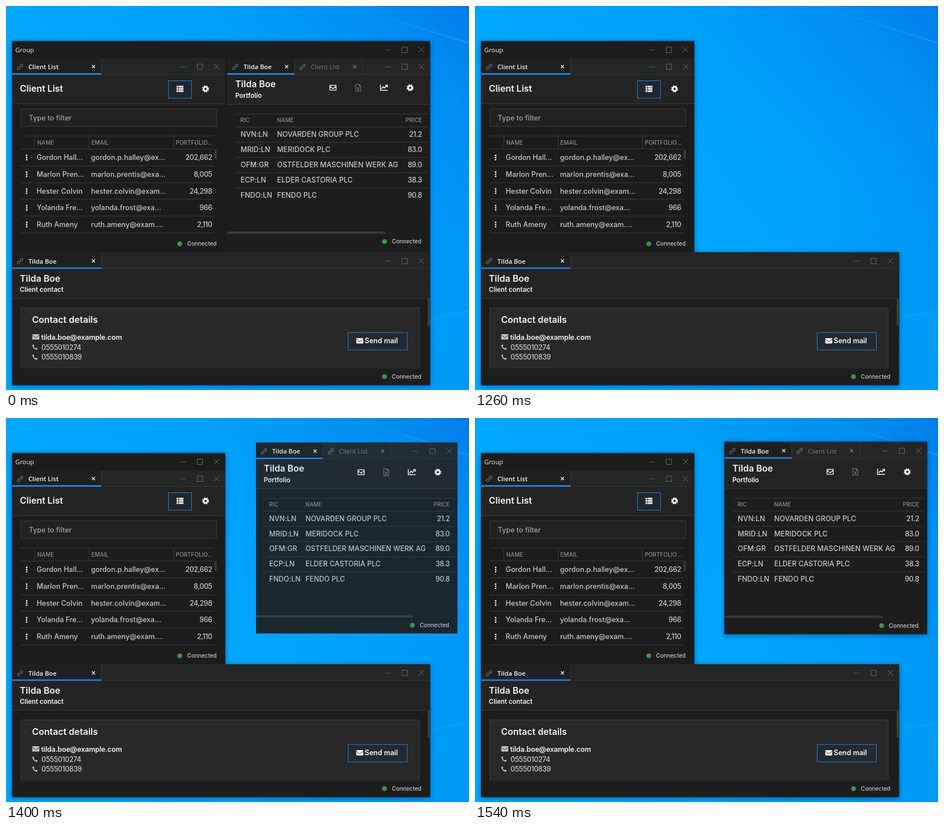
Animation, 822 px wide and 681 px high, one loop 2.93 s. Source, as an HTML page:

```html
<!DOCTYPE html>
<html lang="en">
<head>
<meta charset="utf-8">
<title>Window undocking</title>
<style>
html, body { margin: 0; width: 100%; height: 100%; overflow: hidden; background: #00a2f8; }
svg { display: block; width: 822px; height: 681px; }
text { font-family: Inter, "Noto Sans", sans-serif; white-space: pre; }
text.ui { font-family: "Open Sans", "Noto Sans", sans-serif; }
</style>
</head>
<body>
<svg id="stage" viewBox="0 0 822 681" xmlns="http://www.w3.org/2000/svg"></svg>
<script>
const LOOP = 2930, START = 1120, STEP = 70;
const BLUE = '#2080d6', LINE = '#393939', WHITE = '#f4f4f4', SOFT = '#c8c8c8', DIM = '#8c8c8c';
const CLIENT = 'Tilda Boe';

const rect = (x, y, w, h, fill, extra = '') =>
  `<rect x="${x}" y="${y}" width="${w}" height="${h}" fill="${fill}" ${extra}/>`;
const box = (x, y, w, h, fill, stroke) => rect(x, y, w, h, fill, `stroke="${stroke}"`);
const path = (d, stroke, width = 1, extra = '') =>
  `<path d="${d}" fill="none" stroke="${stroke}" stroke-width="${width}" ${extra}/>`;
const hline = (x1, x2, y, color = LINE) => rect(x1, y, x2 - x1, 1, color);
const vline = (x, y1, y2, color = LINE) => rect(x, y1, 1, y2 - y1, color);
const at = (x, y, body, turn = 0) => `<g transform="translate(${x} ${y}) rotate(${turn})">${body}</g>`;

function text(x, y, size, str, fill = SOFT, o = {}) {
  return `<text x="${x}" y="${y}" font-size="${size}" fill="${fill}" font-weight="${o.weight || 400}"` +
    ` text-anchor="${o.end ? 'end' : 'start'}" letter-spacing="${o.gap || 0}" class="${o.ui ? 'ui' : ''}">${str}</text>`;
}
const cell = (x, y, str, fill = SOFT) => text(x, y, 12.5, str, fill, { weight: 500, gap: 0.05 });
const num = (x, y, str, end = true) => text(x, y, 12.5, str, SOFT, { weight: 500, gap: -0.4, end });
const label = (x, y, str, end) => text(x, y, 10, str, DIM, { weight: 500, end });
const heading = (x, y, str) => text(x, y, 16, str, WHITE, { weight: 600 });
const subhead = (x, y, str) => text(x, y, 11.5, str, WHITE, { weight: 600 });

// icons
const link = (x, y) => at(x, y,
  path('M-0.8-2H-4a2 2 0 0 0 0 4h2.8M0.8 2H4a2 2 0 0 0 0-4H1.2M-2 0H2', '#858585', 1), -45);
const cross = (x, y, r, color, w) =>
  path(`M${x - r} ${y - r}L${x + r} ${y + r}M${x + r} ${y - r}L${x - r} ${y + r}`, color, w);
const controls = (right, y) =>
  path(`M${right - 65} ${y + 0.5}h10`, '#5c5c5c') +
  path(`M${right - 34.5} ${y - 4.5}h9.5v9.5h-9.5z`, '#686868') + cross(right, y, 4.8, '#6e6e6e', 1);
const gear = (x, y) => at(x, y,
  `<circle r="3.5" fill="none" stroke="${WHITE}" stroke-width="3"/>` +
  `<circle r="5.2" fill="none" stroke="${WHITE}" stroke-width="2" stroke-dasharray="2.04 2.04"/>`, 11);
const mailFull = (x, y, color, back) =>
  rect(x, y, 12.5, 9.5, color, 'rx="1"') + path(`M${x} ${y + 2}l6.2 4.4l6.3-4.4`, back, 0.9);
const mailLine = (x, y) =>
  path(`M${x - 5.5} ${y - 4.2}h11v8.6h-11zM${x - 5.5} ${y - 2.4}l5.5 4l5.5-4`, WHITE, 1.4, 'stroke-linejoin="round"');
const sheet = (x, y) =>
  path(`M${x - 4.5} ${y - 6}h6l3 3v9h-9zM${x + 1.5} ${y - 6}v3h3M${x - 2} ${y - 0.8}l4 5M${x + 2} ${y - 0.8}l-4 5`, '#707070', 1.2);
const chart = (x, y) =>
  path(`M${x - 6.3} ${y - 5.5}v10h13`, WHITE, 1.5) +
  path(`M${x - 4.2} ${y + 1.6}l3.2-3.4l2.3 2.2l4-4.4M${x + 2.5} ${y - 4.5}h3.5v3.5`, WHITE, 1.7);
const phone = (x, y) => at(x, y,
  path('M-3.2-3.6C-3.2 0.6-0.4 3.4 3.6 3.6', SOFT, 1.7) +
  path('M-3.3-4.2l0.8 2.4M4.2 3.4l-2.3-1', SOFT, 2.8));
const list = (x, y) => [-4, 0, 4].map(d =>
  rect(x - 6, y + d - 1.5, 3.4, 3, WHITE) + rect(x - 1.8, y + d - 1.5, 8, 3, WHITE)).join('');
const dots = (x, y) => [-3.8, 0, 3.8].map(d => rect(x - 1.3, y + d - 1.3, 2.6, 2.6, WHITE, 'rx="0.8"')).join('');
const status = (right, y) =>
  `<circle cx="${right - 65.5}" cy="${y}" r="4.3" fill="#43934a"/>` +
  text(right, y + 3.5, 10, 'Connected', SOFT, { end: true, weight: 500 });

function tab(x, y, w, name, active = true) {
  return (active ? rect(x, y, w, 29, '#1f1f1f') + rect(x, y + 26, w, 3, BLUE) : '') +
    vline(x + w - 0.5, y, y + 29) + link(x + 14, y + 15) +
    text(x + 28.7, y + 19, 11.3, name, active ? WHITE : '#7c7c7c', { ui: true, weight: active ? 600 : 400 }) +
    cross(x + w - 14.2, y + 14.5, 2.7, active ? '#e8e8e8' : '#777', 1.4);
}
const tabBar = (x, y, w) => rect(x, y, w, 29.5, '#232625') + hline(x, x + w, y + 28, '#343434');

function clientList() {
  const rows = [
    ['Gordon Hall...', 'gordon.p.halley@ex...', '202,662'],
    ['Marlon Pren...', 'marlon.prentis@exa...', '8,005'],
    ['Hester Colvin', 'hester.colvin@exam...', '24,298'],
    ['Yolanda Fre...', 'yolanda.frost@exa...', '966'],
    ['Ruth Ameny', 'ruth.ameny@exam....', '2,110']
  ];
  return tabBar(11, 93, 378) + tab(11, 93, 158.5, 'Client List') + controls(374, 107.5) +
    rect(11, 122, 378, 51, '#232323') + hline(11, 389, 173) +
    heading(24.5, 152, 'Client List') +
    box(288.5, 132.5, 41, 31, '#20262d', BLUE) + list(308.8, 147) + gear(354.3, 147) +
    box(26.5, 182.5, 347.5, 31, '#212121', '#3a3a3a') + cell(40.5, 202.5, 'Type to filter', '#a0a0a0') +
    hline(26, 370, 230) + hline(26, 370, 253) +
    [50.5, 147, 297].map(x => vline(x, 230, 253)).join('') +
    label(55.5, 245.5, 'NAME') + label(151.5, 245.5, 'EMAIL') + label(301.5, 245.5, 'PORTFOLIO...') +
    rows.map((r, i) => {
      const y = 273 + i * 29.75;
      return dots(36.7, y - 4.3) + cell(54.5, y, r[0]) + cell(151, y, r[1]) + num(366, y, r[2]) +
        hline(26, 370, Math.round(y + 9.8));
    }).join('') +
    rect(370.5, 254.5, 3.5, 16.5, '#3d3d3d') + status(374, 421.7);
}

function portfolio() {
  const rows = [
    ['NVN:LN', 'NOVARDEN GROUP PLC', '21.2'],
    ['MRID:LN', 'MERIDOCK PLC', '83.0'],
    ['OFM:GR', 'OSTFELDER MASCHINEN WERK AG', '89.0'],
    ['ECP:LN', 'ELDER CASTORIA PLC', '38.3'],
    ['FNDO:LN', 'FENDO PLC', '90.8']
  ];
  return rect(393, 92, 359.3, 340.5, '#1d1d1d') + tabBar(393, 93, 359.3) +
    tab(393, 93, 119.5, CLIENT) + tab(512.5, 93, 120.5, 'Client List', false) + controls(737.5, 107.5) +
    rect(393, 122, 359.3, 52, '#232323') + hline(393, 752.3, 174) +
    heading(407, 144, CLIENT) + subhead(407, 163, 'Portfolio') +
    mailLine(580.5, 145) + sheet(625.3, 145) + chart(671, 145) + gear(717.4, 145) +
    hline(408, 748, 191) + hline(408, 748, 214) +
    label(416, 206, 'RIC') + label(481, 206, 'NAME') + label(738.5, 206, 'PRICE', true) +
    rows.map((r, i) => {
      const y = 232.3 + i * 26.8;
      return cell(416.5, y, r[0]) + cell(481.3, y, r[1]) + num(738.5, y, r[2]) +
        (i < 4 ? hline(408, 748, 241 + i * 27) : '');
    }).join('') +
    rect(393, 400, 281, 4, '#393939') + status(737.5, 417.8);
}

function contact() {
  return rect(11, 437, 741.5, 235, '#1d1d1d') + tabBar(11, 437, 741.5) +
    tab(11, 437.5, 158.5, CLIENT) + controls(737.5, 452) +
    rect(11, 466.5, 741.5, 52, '#232323') + hline(11, 752.5, 518) +
    heading(24.5, 488.5, CLIENT) + subhead(24.5, 507.3, 'Client contact') +
    rect(26, 535, 708, 108, '#282828') + path('M26.5 643V535.5H733.5V643', '#3e3e3e') +
    text(46.3, 562, 16, 'Contact details', WHITE, { weight: 600 }) +
    mailFull(46.6, 582, '#c2c2c2', '#282828') + phone(51.3, 605) + phone(51.3, 622.7) +
    text(62.5, 591.7, 12.5, 'tilda.boe@example.com', WHITE, { weight: 600, gap: -0.15 }) +
    num(63, 609.5, '0555010274', false) + num(63, 627.3, '0555010839', false) +
    box(607.5, 579, 105, 31, '#24292f', BLUE) + mailFull(621.8, 589, WHITE, '#24292f') +
    text(636.8, 598.3, 12.5, 'Send mail', WHITE, { weight: 600 }) +
    rect(748.5, 519, 4, 48, '#3b3b3b') + status(737.5, 657.2);
}

const WIDE = 'M11 62.5H752.5V672H11Z', NARROW = 'M11 62.5H389V437H752.5V672H11Z';
const PANEL = 'M393 92H752.3V432.5H393Z';
// soft shadow with a thin translucent rim
const shadow = (id, d) => `<g id="${id}">
  <path d="${d}" transform="translate(0 2)" fill="#001830" opacity=".5" filter="url(#blur)"/>
  ${path(d, '#001830', 2, 'opacity=".4"')}</g>`;

document.getElementById('stage').innerHTML = `
<defs>
  <linearGradient id="sky" gradientUnits="userSpaceOnUse" x1="330" y1="440" x2="850" y2="-40">
    <stop offset="0" stop-color="#00a9fd"/><stop offset="0.45" stop-color="#009ffa"/>
    <stop offset="0.75" stop-color="#008ef2"/><stop offset="1" stop-color="#0076e5"/>
  </linearGradient>
  <linearGradient id="low" x1="0" y1="0" x2="1" y2="1">
    <stop offset="0.6" stop-color="#0086ee" stop-opacity="0"/><stop offset="1" stop-color="#0086ee" stop-opacity=".45"/>
  </linearGradient>
  <linearGradient id="ray"><stop offset="0" stop-color="#3cb4ff" stop-opacity="0"/><stop offset="1" stop-color="#3cb4ff" stop-opacity=".4"/></linearGradient>
  <filter id="blur" x="-10%" y="-10%" width="120%" height="120%"><feGaussianBlur stdDeviation="5"/></filter>
</defs>
${rect(0, 0, 822, 681, 'url(#sky)')}${rect(0, 0, 822, 681, 'url(#low)')}
${path('M608 -1L824 66.5', 'url(#ray)', 2.5)}
<path d="M640 574L822 541V681H640Z" fill="#0cacff" opacity=".13"/>
${path('M640 572L824 540', 'url(#ray)', 1.5)}
${shadow('shade', WIDE)}
<path id="frame" fill="#1c1c1c"/>
${text(16.5, 82, 11.3, 'Group', '#f0f0f0', { ui: true })}
<g id="buttons">${controls(374, 77.5)}</g>
${clientList()}${contact()}
<g id="panel">${shadow('panelShade', PANEL)}${portfolio()}</g>`;

const [shade, frame, buttons, panel, panelShade] =
  ['shade', 'frame', 'buttons', 'panel', 'panelShade'].map(id => document.getElementById(id));
const set = (el, attrs) => { for (const k in attrs) el.setAttribute(k, attrs[k]); };
const clamp = v => Math.max(0, Math.min(1, v));

function draw(time) {
  const step = Math.floor((time % LOOP - START) / STEP);
  const docked = step < 0;
  const outline = docked ? WIDE : NARROW;
  set(frame, { d: outline });
  for (const part of shade.children) set(part, { d: outline });
  set(shade, { opacity: docked ? 1 : clamp(step / 2) });
  set(buttons, { opacity: docked || step >= 1 ? 1 : 0, transform: `translate(${docked ? 363.5 : 0} 0)` });

  // the detached panel grows slightly while fading in
  const shown = docked || step >= 4;
  const scale = step === 4 ? 0.995 : 1;
  const move = docked ? '' :
    `translate(50 -49.5) translate(572.5 262.5) scale(${scale}) translate(-572.5 -262.5)`;
  set(panel, { visibility: shown ? 'visible' : 'hidden', transform: move, opacity: step === 4 ? 0.92 : 1 });
  set(panelShade, { opacity: docked ? 0 : clamp((step - 4) / 2) });
}

function tick() {
  draw(performance.now());
  requestAnimationFrame(tick);
}
tick();
</script>
</body>
</html>
```
